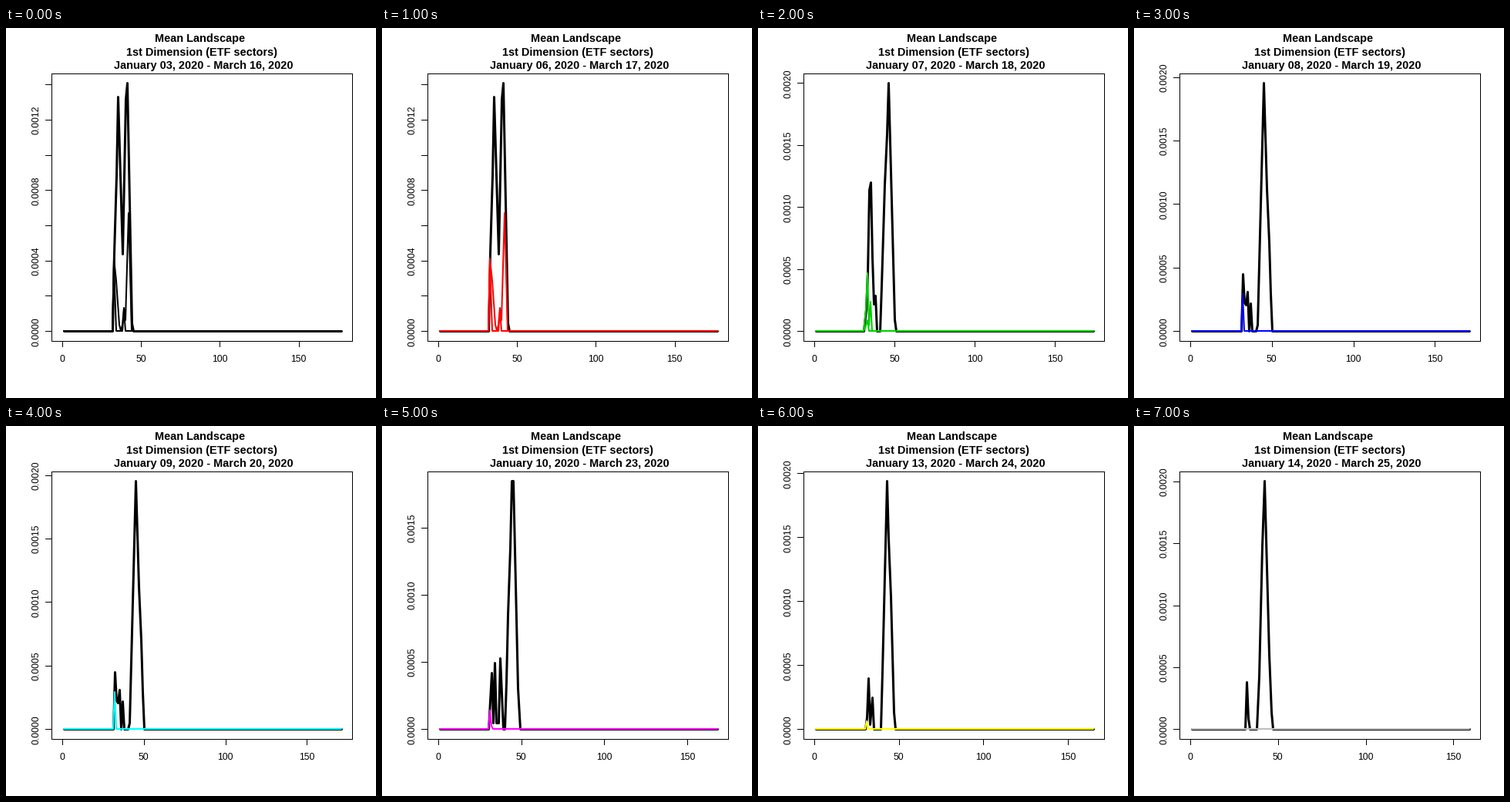
These frames come from a looping animation (480 px wide and 480 px high, 8 s). A matplotlib script:

```python
import numpy as np
import matplotlib.pyplot as plt
from matplotlib.animation import FuncAnimation

SIZE = 480
LEFT, RIGHT, TOP, BOTTOM = 59.04, 449.76, 59.04, 406.56   # plot region
TICK = 7.2
PAD = 0.04 / 1.08                                         # 4% axis expansion
X0, X_SPAN = LEFT + PAD * (RIGHT - LEFT), (RIGHT - LEFT) / 1.08
Y0, Y_SPAN = BOTTOM - PAD * (BOTTOM - TOP), (BOTTOM - TOP) / 1.08

plt.rcParams["font.family"] = "Liberation Sans"
fig = plt.figure(figsize=(SIZE / 72, SIZE / 72), dpi=72, facecolor="white")
ax = fig.add_axes([0, 0, 1, 1])

# Each landscape: point count, then layers made of tents.
# A tent is (centre, height in 1e-4, left reach, right reach); reach is 1 if left out.
EARLY = (177, [[(35, 13.3, 3, 4.4), (40, 13.2, 3, 3), (41, 14.08, 1, 3.1)],
               [(33, 4.1, 1, 3.3), (39, 1.3, 1.4, 1.4), (42, 6.7, 2.2, 2)],
               [(33, 3.8), (39, 1.2)]])
SPLIT = (174, [[(33, 4.7, 1.6), (34, 11.4, 1.7), (35, 12, 1, 2),
                (38, 2.9, 4), (46, 20, 4.9, 4.2)],
               [(33, 4.7, 1.6, 1.1), (35, 2.4)],
               [(33, 0.9, 2)]])
STEEP = (171, [[(32, 4.5, 1, 2), (35, 3.1, 3), (37, 2.2), (45, 19.53, 4.1, 4.7)],
               [(32, 2.9)]])
TWIN = (168, [[(32, 4.2, 2, 1.1), (34, 4.95, 1.1, 1.1), (37, 5.3, 1.1, 2),
               (44, 18.45, 3.7), (45, 18.45, 1, 3.6)],
              [(31, 1.4, 1, 1.2)]])
FADING = (165, [[(32, 4, 1.3, 1.1), (34, 2.5), (43, 19.4, 3.9, 4.3)],
                [(31, 0.6)]])
LATE = (159, [[(32, 3.8, 1, 1.3), (42, 20.03, 3.8, 4.3)],
              []])

LANDSCAPES = [EARLY, EARLY, SPLIT, STEEP, STEEP, TWIN, FADING, LATE]
COLORS = ["#000000", "#ff0000", "#00cd00", "#0000ff",
          "#00ffff", "#ff00ff", "#ffff00", "#bebebe"]


def line(xs, ys, color="black", width=1):
    """Draw a line whose points sit on whole pixels; thin lines are hard-edged."""
    shift = 0.5 * (width % 2)
    ax.plot(np.floor(xs) + shift, np.floor(ys) + shift, color=color, lw=width,
            antialiased=width > 1, snap=False, solid_capstyle="round",
            solid_joinstyle="round")


def label(x, y, text, size=12.2, **style):
    ax.text(x, y, text, size=size, ha="center", va="baseline",
            rotation_mode="anchor", **style)


def tent(x, centre, height, left=1, right=1):
    reach = np.where(x < centre, left, right)
    return height * np.clip(1 - abs(x - centre) / reach, 0, None)


def draw_titles(step):
    start, end = (np.busday_offset(day, step).astype(object).strftime("%B %d, %Y")
                  for day in ("2020-01-03", "2020-03-16"))
    rows = [(252, 18, "Mean Landscape"),
            (254, 36, "1st Dimension (ETF sectors)"),
            (256, 53, f"{start} - {end}")]
    for x, y, text in rows:
        label(x, y, text, size=14.5, weight="bold")


def draw_axes(n, peak):
    line([LEFT, RIGHT, RIGHT, LEFT, LEFT], [TOP, TOP, BOTTOM, BOTTOM, TOP])
    for x in range(0, n + 1, 50):
        px = X0 + x / n * X_SPAN
        line([px, px], [BOTTOM, BOTTOM + TICK])
        label(px - 0.5, 433, str(x))

    step, every = (2, 2) if peak < 15 else (5, 1)
    for i, y in enumerate(np.arange(0, peak * 1.04, step)):
        py = Y0 - y / peak * Y_SPAN
        line([LEFT - TICK, LEFT], [py, py])
        if i % every == 0:
            label(42.5, py, f"{y / 1e4:.4f}", rotation=90)


def draw_layer(n, peak, tents, color, width):
    x = np.arange(1, n + 1)
    values = np.max([0 * x] + [tent(x, *t) for t in tents], axis=0)
    line(X0 + x / n * X_SPAN, Y0 - values / peak * Y_SPAN, color, width)


def draw(i):
    n, (main, *others) = LANDSCAPES[i]
    peak = max(t[1] for t in main)
    ax.clear()
    ax.set(xlim=(0, SIZE), ylim=(SIZE, 0))
    ax.axis("off")
    draw_titles(i)
    draw_axes(n, peak)
    draw_layer(n, peak, main, "black", 3)
    for tents in others:
        draw_layer(n, peak, tents, COLORS[i], 2)
    return []


anim = FuncAnimation(fig, draw, frames=len(LANDSCAPES), interval=1000,
                     init_func=lambda: [], repeat=True, repeat_delay=0)
plt.show()
```
